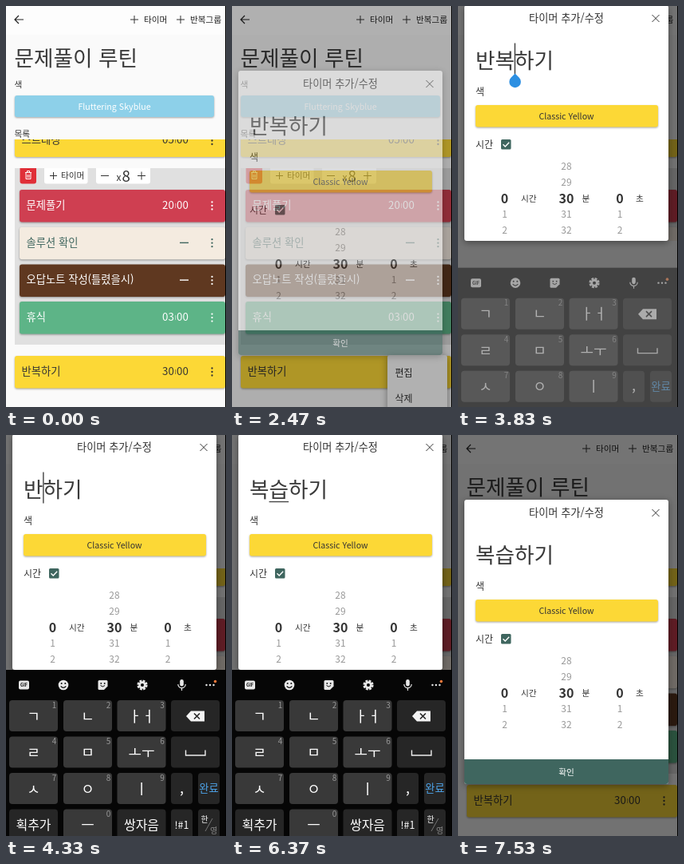
Animation of 276 by 502 pixels, one loop 8000 ms. Source, as an HTML page:

```html
<!DOCTYPE html>
<html lang="ko">
<head>
<meta charset="utf-8">
<style>
html, body { margin: 0; width: 100%; height: 100%; overflow: hidden; background: #fafafa; }
svg { display: block; width: 100%; height: 100%; font-family: 'Noto Sans CJK KR', 'Noto Sans', sans-serif; }
.raised { filter: drop-shadow(0 1px 1px rgba(0,0,0,.35)); }
.floating { filter: drop-shadow(0 2px 4px rgba(0,0,0,.4)); }
</style>
</head>
<body>
<svg id="stage" viewBox="0 0 276 502"></svg>
<script>
const LOOP = 8000, BIG = 26.67, CHAR = BIG * 0.92;
const TEAL = '#3f665f', YELLOW = '#fcd836', INK = '#333';

// Markup helpers; text is placed by its vertical centre.
const text = (x, y, s, size, fill = INK, anchor = 'start', weight = 400, extra = '') =>
  `<text x="${x}" y="${y + size * 0.37}" font-size="${size}" fill="${fill}" text-anchor="${anchor}" font-weight="${weight}" ${extra}>${s}</text>`;
const rect = (x, y, w, h, fill, rx = 0, extra = '') =>
  `<rect x="${x}" y="${y}" width="${w}" height="${h}" rx="${rx}" fill="${fill}" ${extra}/>`;
const line = (d, color = INK, w = 1, extra = '') =>
  `<path d="${d}" fill="none" stroke="${color}" stroke-width="${w}" ${extra}/>`;
const dot = (x, y, r, fill) => `<circle cx="${x}" cy="${y}" r="${r}" fill="${fill}"/>`;
const plus = (x, y, r = 5) => line(`M${x - r} ${y}h${2 * r}M${x} ${y - r}v${2 * r}`);

function row(x, y, color, ink, label, minutes) {
  const c = y + 20;
  const time = minutes
    ? text(203.5, c - 1, minutes, 13.3, ink, 'middle') + text(221.5, c - 1, '00', 13.3, ink, 'middle') +
      rect(212.3, c - 3, 0.8, 6, ink, 0, 'opacity=".7"')
    : rect(218, c - 1, 11, 1.4, ink);
  return rect(x, y, 275 - x, 40.5, color, 3, 'class="raised"') +
    text(x + 8.5, c - 1, label, 13.3, ink) + time +
    [-4.5, 0, 4.5].map(d => dot(258.5, c + d, 1.15, ink)).join('');
}

const page = () =>
  rect(0, 0, 276, 502, '#fafafa') + rect(0, 0, 276, 36, '#fdfdfd') +
  line('M22 17H11M16 12l-5 5l5 5', '#222', 1.2) +
  plus(161, 17) + text(173, 17.5, '타이머', 10.67, '#222') +
  plus(219, 17) + text(231, 17.5, '반복그룹', 10.67, '#222') +
  text(10.5, 65, '문제풀이 루틴', BIG, '#3a3a3a') +
  text(10.5, 98, '색', 10.67) +
  rect(11, 112, 250, 27, '#8dd0e9', 3, 'class="raised"') +
  text(136, 126, 'Fluttering Skyblue', 10.67, '#fff', 'middle') +
  '<g clip-path="url(#listClip)">' +
    row(11, 148.5, YELLOW, INK, '스트레칭', '05') +
    rect(11, 203, 264, 221, '#e0e0e0') +
    '<g clip-path="url(#groupClip)">' +
      rect(17.5, 198, 20.5, 24.5, '#e02f38', 3) +
      line('M24 208.5h8M26.5 208v-1.5h3v1.5M25 209v7.5h6V209M27 211v4M29 211v4', '#fff') +
      rect(48, 198, 54.5, 24.5, '#fff', 3) + rect(113, 198, 68, 24.5, '#fff', 3) +
    '</g>' +
    plus(59.5, 212.5, 4.5) + text(69, 212.5, '타이머', 10.67) +
    line('M119 212.5h10') + text(138.5, 215, 'x', 12) + text(145.5, 213.5, '8', 18.67) + plus(170, 212.5) +
    row(17, 230, '#cf3f51', '#fff', '문제풀기', '20') +
    row(17, 276.7, '#f4ebe0', TEAL, '솔루션 확인') +
    row(17, 323.4, '#5f3820', '#fff', '오답노트 작성(틀렸을시)') +
    row(17, 370.1, '#5db487', '#fff', '휴식', '03') +
    row(11, 438, YELLOW, INK, '반복하기', '30') +
  '</g>' +
  text(10.5, 160, '목록', 10.67) +
  rect(0, 294, 276, 208, '#fafafa', 0, 'id="inset"') +
  `<circle id="ripple" cx="258.5" cy="458" r="13" fill="#000"/>`;

const menu = () =>
  `<g id="menu"><rect id="menuCard" y="437" fill="#fff" rx="3" class="floating"/>` +
  text(204.5, 460, '편집', 12, INK, 'start', 400, 'id="edit"') +
  text(204.5, 492, '삭제', 12, INK, 'start', 400, 'id="remove"') + '</g>';

function wheel(x, values, unit, unitX) {
  return values.map((v, i) => i === 2
    ? text(x, 323.5, v, 16, INK, 'middle', 700)
    : text(x, 283 + 20 * i, v, 12, '#999', 'middle')).join('') + text(unitX, 323, unit, 10.67);
}

const dialog = () =>
  `<g id="dialog"><rect id="sheet" x="8" y="81" width="256" rx="3" fill="#fff" class="floating"/>
  <g clip-path="url(#sheetClip)">` +
  text(136, 97, '타이머 추가/수정', 13.2, INK, 'middle', 500) +
  line('M243.5 93l9 9M252.5 93l-9 9') +
  text(22, 150, '', BIG, '#3a3a3a', 'start', 400, 'id="field"') +
  rect(22, 165, CHAR, 1.2, '#3a3a3a', 0, 'id="underline"') +
  rect(71, 128.5, 1.3, 39, '#333', 0, 'id="caret"') +
  text(22, 190, '색', 12) +
  rect(22, 206, 229, 27.5, YELLOW, 3, 'class="raised"') +
  text(136, 220, 'Classic Yellow', 10.67, INK, 'middle', 500) +
  text(22, 256, '시간', 12) +
  rect(54, 249, 12.5, 12.5, TEAL, 1.5) + line('M56.5 255.3l2.7 2.7l5-5.3', '#fff', 1.4) +
  wheel(58.5, ['', '', 0, 1, 2], '시간', 79) +
  wheel(136, [28, 29, 30, 31, 32], '분', 155.5) +
  wheel(203, ['', '', 0, 1, 2], '초', 223) +
  rect(8, 406, 256, 31, TEAL) + text(136, 422, '확인', 10.67, '#fff', 'middle', 500) +
  `</g><path id="handle" d="M71.6 166.6l5.2 5.2a7.3 7.3 0 1 1-10.4 0z" fill="#2c8fe2"/></g>`;

const COLS = [4, 72, 139.5, 207], ROWS = [332, 377.5, 423, 468.5];
function key(id, x, y, w, body, special = false) {
  return `<g>${rect(x, y, w, 39, special ? '#262626' : '#393939', 4, `id="key-${id}"`)}${body}</g>`;
}
function letterKey(label, col, r, number) {
  const x = COLS[col], y = ROWS[r];
  const size = label.length > 2 ? 16 : 18;
  const digit = number === undefined ? '' : text(x + 56.5, y + 6, number, 10, '#999', 'middle');
  return key(label, x, y, 61, text(x + 30.5, y + 20, label, size, '#fff', 'middle') + digit, label.length > 2);
}

const keyboard = () => {
  const W = '#e8e8e8';
  return '<g id="keyboard">' + rect(0, 294, 276, 280, '#060606') +
    rect(16, 307.5, 13, 11, W, 2) + text(22.5, 313, 'GIF', 5.5, '#111', 'middle', 700) +
    dot(72, 313, 6.3, W) + dot(69.7, 311, 1, '#111') + dot(74.3, 311, 1, '#111') + line('M68.7 314.5q3.3 3.8 6.6 0', '#111', 1.2) +
    `<path d="M117 307h9a1.5 1.5 0 0 1 1.500 1.500v6l-4.500 4.500h-6a1.500 1.500 0 0 1-1.500-1.500v-9a1.500 1.500 0 0 1 1.500-1.500z" fill="${W}"/>` +
    dot(119.3, 311, 0.9, '#111') + dot(123.7, 311, 0.9, '#111') + line('M118.5 313.5q3 3 5.500 0', '#111') +
    `<circle cx="171" cy="313" r="5.4" fill="none" stroke="${W}" stroke-width="2.4" stroke-dasharray="2.83 1.41"/>` +
    `<circle cx="171" cy="313" r="3.4" fill="none" stroke="${W}" stroke-width="2.8"/>` +
    rect(218.2, 306, 4.6, 8.500, W, 2.3) + line('M215.800 312a4.700 4.700 0 0 0 9.400 0M220.500 317v3', W, 1.2) +
    [251.500, 256, 260.500].map(x => dot(x, 313, 1.2, W)).join('') + dot(262.500, 308.500, 1.8, '#f0793a') +
    ['ㄱ', 'ㄴ', 'ㅏㅓ', 'ㄹ', 'ㅁ', 'ㅗㅜ', 'ㅅ', 'ㅇ', 'ㅣ'].map((s, i) => letterKey(s, i % 3, i / 3 | 0, i + 1)).join('') +
    letterKey('획추가', 0, 3) + letterKey('ㅡ', 1, 3, 0) + letterKey('쌍자음', 2, 3) +
    key('back', 207, ROWS[0], 61,
      '<path d="M226 352l6-6.500h17v13h-17z" fill="#f4f4f4"/>' + line('M236 348.500l7 7M243 348.500l-7 7', '#262626', 1.6), true) +
    key('space', 207, ROWS[1], 61, line('M225.500 394.500v6.500h24.500v-6.500', '#eee', 1.4), true) +
    key('comma', 207, ROWS[2], 27, text(220.500, 442, ',', 18, '#fff', 'middle'), true) +
    key('done', 241, ROWS[2], 27, text(254.500, 442, '완료', 13.3, '#4da3e8', 'middle'), true) +
    key('symbols', 207, ROWS[3], 27, text(220.500, 488, '!#1', 12.500, '#fff', 'middle'), true) +
    key('lang', 241, ROWS[3], 27, text(249, 481, '한', 10, '#fff', 'middle') +
      line('M250 496l9-16', '#888', 0.8) + text(260.500, 495, '영', 10, '#888', 'middle'), true) +
    '</g>';
};

document.getElementById('stage').innerHTML =
  `<defs><clipPath id="listClip">${rect(0, 167, 276, 335, '#000')}</clipPath>
  <clipPath id="groupClip">${rect(0, 203, 276, 40, '#000')}</clipPath>
  <clipPath id="sheetClip"><rect id="sheetMask" x="8" y="81" width="256" rx="3"/></clipPath></defs>` +
  page() + menu() + rect(0, 0, 276, 502, '#000', 0, 'id="scrim"') + dialog() + keyboard() +
  rect(275, 0, 1, 502, '#000');

// Key presses: down, up, key
const PRESSES = [
  [4170, 4330, 'back'], [4400, 4500, 'back'], [4600, 4700, 'ㅁ'], [4800, 4900, '획추가'],
  [5000, 5100, 'ㅗㅜ'], [5200, 5300, 'ㄱ'], [5330, 5430, 'ㅅ'], [5460, 5530, 'ㅡ'],
  [5670, 5770, 'ㅁ'], [5830, 5970, '획추가']
];
// Text before the caret: time, text, composing
const TYPED = [
  [0, '반복'], [4330, '반'], [4470, ''], [4650, 'ㅁ', 1], [4830, 'ㅂ', 1], [5070, '보', 1],
  [5230, '복', 1], [5370, '복ㅅ', 1], [5500, '복스', 1], [5700, '복슴', 1], [5870, '복습', 1], [6400, '복습']
];

const el = id => document.getElementById(id);
const set = (id, attrs) => { for (const k in attrs) el(id).setAttribute(k, attrs[k]); };
const show = (id, on) => set(id, { visibility: on ? 'inherit' : 'hidden' });
const ramp = (t, a, b) => Math.min(1, Math.max(0, (t - a) / (b - a)));
const easeOut = x => 1 - (1 - x) ** 2;
const keyFills = new Map([...document.querySelectorAll('[id^="key-"]')].map(k => [k, k.getAttribute('fill')]));

function render(t) {
  const m = t < 2000 ? ramp(t, 980, 1290) : 1 - ramp(t, 2430, 2730);
  const grow = easeOut(ramp(m, 0, 0.29)), width = 75 * grow;
  set('ripple', { opacity: 0.1 * ramp(t, 870, 960) * (1 - ramp(t, 1050, 1200)) });
  set('menu', { opacity: ramp(m, 0, 0.33) });
  set('menuCard', { x: 270 - width, width, height: 74 * easeOut(ramp(m, 0, 0.57)) });
  set('edit', { opacity: ramp(m, 0.25, 0.6) });
  set('remove', { opacity: ramp(m, 0.45, 0.8) });

  const open = ramp(t, 2420, 2570);
  set('scrim', { opacity: 0.54 * easeOut(open) });

  const lift = easeOut(ramp(t, 3700, 3800)) - easeOut(ramp(t, 6450, 6560));
  const height = 356 - 61 * lift;
  set('dialog', { opacity: easeOut(open), transform: `translate(0 ${-82 * lift})` });
  set('sheet', { height });
  set('sheetMask', { height });
  show('inset', t >= 3700 && t < 6450);

  const [, typed, composing] = TYPED.filter(s => t >= s[0]).pop();
  el('field').textContent = typed + '하기';
  const caretX = 22 + CHAR * typed.length;
  show('underline', composing);
  set('underline', { x: caretX - CHAR });
  set('caret', { x: caretX - 0.3 });
  show('caret', (t >= 3130 && t < 6370) || (t >= 7030 && t < 7530));
  set('handle', { opacity: t < 4330 ? ramp(t, 3200, 3350) : 0 });

  const up = ramp(t, 3730, 3960) - ramp(t, 6400, 6600);
  set('keyboard', { opacity: up, transform: `translate(0 ${60 * (1 - up)})` });
  const lit = PRESSES.find(p => t >= p[0] && t < p[1]);
  keyFills.forEach((fill, k) => k.setAttribute('fill', lit && k.id === 'key-' + lit[2] ? '#646464' : fill));
}

const start = performance.now();
function tick() {
  render((performance.now() - start) % LOOP);
  requestAnimationFrame(tick);
}
tick();
</script>
</body>
</html>
```
